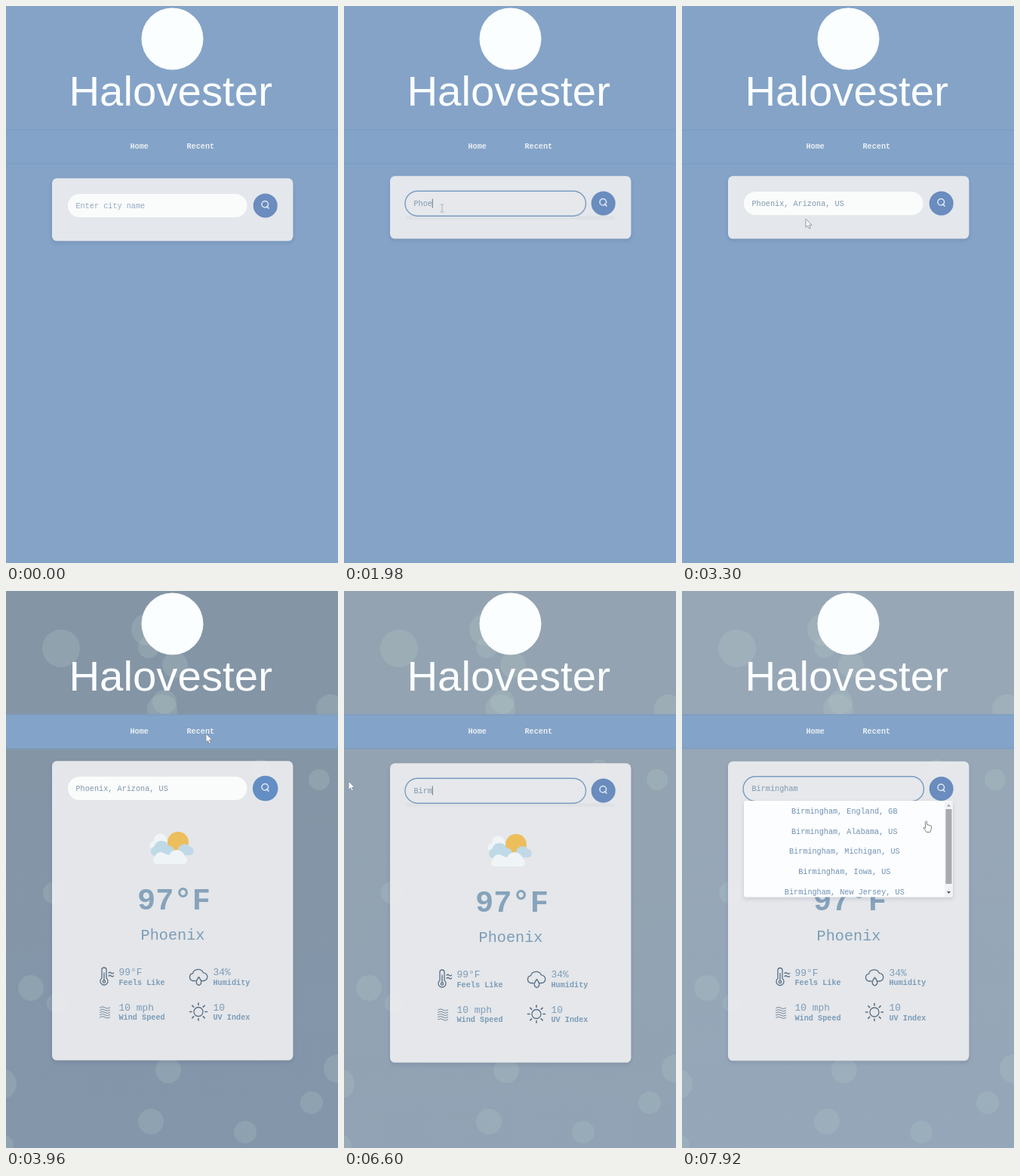
Write an HTML page that moves like this. It is 440 px wide and 738 px high and loops after 8 s.

```html
<!DOCTYPE html>
<html lang="en">
<head>
<meta charset="utf-8">
<title>Weather search</title>
<style>
  html, body { margin: 0; width: 100%; height: 100%; overflow: hidden; background: #84a3c7; }
  svg { display: block; width: 100%; height: 100%; }
  text { font-family: "Liberation Mono", "Courier New", monospace; font-size: 10.2px; white-space: pre; }
  .logo { font: 56.4px "Liberation Sans", Arial, sans-serif; fill: #fbfeff; }
  .bold { font-weight: bold; }
  .mid { text-anchor: middle; }
  #nav text { fill: #e9eff3; font-weight: bold; }
  #result text { fill: #7c9cb8; }
  #result .big { font-size: 40.4px; fill: #86a3bb; }
  #result .city { font-size: 20.2px; }
  #result .num { font-size: 12.9px; }
  #list text { fill: #6f91b3; }
  .line { fill: none; stroke: #5a6f85; stroke-width: 1.3; stroke-linecap: round; stroke-linejoin: round; }
  .pale { fill: #eff4f7; }
  .blue { fill: #c0d9e6; }
</style>
</head>
<body>
<svg viewBox="0 0 440 738" preserveAspectRatio="none">
  <defs>
    <filter id="soft" x="-10%" y="-20%" width="120%" height="150%">
      <feDropShadow dx="0" dy="2.5" stdDeviation="2.5" flood-color="#23344c" flood-opacity=".14"/>
    </filter>
    <linearGradient id="tint" x1="0" y1="0" x2="0" y2="1">
      <stop offset=".3" stop-color="#7f9fd0" stop-opacity="0"/>
      <stop offset="1" stop-color="#7f9fd0" stop-opacity=".1"/>
    </linearGradient>
  </defs>

  <rect id="bg" width="440" height="738"/>
  <g id="bubbles" fill="#b9d0c8" fill-opacity=".22"></g>

  <circle cx="220.5" cy="43.5" r="41" fill="#fbfeff"/>
  <text class="logo" x="83.4" y="132">Halovester</text>

  <g id="nav">
    <rect y="163.5" width="440" height="45" fill="#83a3c8"/>
    <path d="M0 164H440M0 208.8H440" stroke="#7b9bc0" stroke-width="1.4" stroke-opacity=".7"/>
    <text x="164.5" y="188.5">Home</text>
    <text x="239.5" y="188.5">Recent</text>
  </g>

  <g id="card">
    <rect id="panel" x="61" y=".3" width="319.4" rx="6.5" fill="#ecedef" fill-opacity=".93" filter="url(#soft)"/>
    <rect id="strip" x="82" y="53" width="277" height="5" rx="2" fill="#5a6270" fill-opacity=".04"/>
    <rect id="field"/>
    <rect id="mark" x="92.5" y="31" width="122.5" height="11" fill="#315fbd"/>
    <text id="query" x="92.5" y="39.8"></text>
    <path id="caret" stroke="#5d7488"/>
    <circle id="button" cx="343.7" cy="36.5"/>
    <circle cx="343.3" cy="34.8" r="4.3" fill="none" stroke="#dfe8f2" stroke-width="1.5"/>
    <path d="M345.5 37.5L348 40" stroke="#dfe8f2" stroke-width="1.7" stroke-linecap="round"/>

    <g id="result" transform="translate(0 -225)">
      <path class="pale" d="M197 343a6 6 0 0 1-1-12a8.5 8.5 0 0 1 16-5l5 17z"/>
      <circle cx="228" cy="333" r="14" fill="#edbe5c"/>
      <path class="blue" d="M228 350v-8a9 9 0 0 1 16-3a5.7 5.7 0 0 1 1 11z"/>
      <path class="blue" d="M197 351a6.500 6.500 0 0 1-.5-12.500a10 10 0 0 1 19-1a7 7 0 0 1 3 13.500z"/>
      <path class="pale" d="M200 362a5 5 0 0 1-3-9a8 8 0 0 1 13-5l6 2a11 11 0 0 1 21 2a5.3 5.3 0 0 1-1 10z"/>
      <text class="big bold mid" x="222.5" y="422">97°F</text>
      <text class="city mid" x="221" y="462">Phoenix</text>
      <g class="line">
        <path d="M127 513v-11a3 3 0 0 1 6 0v11a5 5 0 1 1-6 0zM130 506v10M136 506q1.7-1.5 3.3 0t3.3 0M136 510q1.7-1.5 3.3 0t3.3 0"/>
        <circle cx="130" cy="517.5" r="1.7"/>
        <path d="M251 516.5h-3.5a5 5 0 0 1 0-9.8a7.5 7.5 0 0 1 14-.8a5.3 5.3 0 0 1 0 10.6h-2M255.5 511.5q-6.5 8.5 0 11q6.5-2.5 0-11z"/>
        <circle cx="255" cy="557.5" r="6"/>
        <path id="rays" stroke-width="1.6"/>
        <path id="waves" stroke-width="1" stroke-opacity=".8"/>
      </g>
    </g>

    <g id="list" transform="translate(0 -225.5)">
      <rect x="82" y="278" width="277" height="127.5" rx="3" fill="#fcfdfe" filter="url(#soft)"/>
      <rect x="348" y="279" width="11" height="126" fill="#f1f2f3"/>
      <rect x="349.5" y="289" width="8" height="99" fill="#a8a9ab"/>
      <path d="M351 285.5l2.5-3l2.5 3z" fill="#a0a2a5"/>
      <path d="M351 398l2.5 3l2.5-3z" fill="#505358"/>
      <g id="rows"></g>
    </g>
  </g>

  <g id="cursor"><path id="pointer"/></g>
</svg>
<script>
const $ = id => document.getElementById(id);
const set = (id, attrs) => {
  for (const k in attrs) $(id).setAttribute(k, attrs[k]);
};
const show = (id, on) => set(id, { visibility: on ? 'visible' : 'hidden' });
const add = (parent, tag, attrs, text = '') => {
  const el = document.createElementNS('http://www.w3.org/2000/svg', tag);
  for (const k in attrs) el.setAttribute(k, attrs[k]);
  el.textContent = text;
  $(parent).append(el);
};

const STEP = 660, LOOP = 8000, CHAR = 6.12;
const SKY = '#84a3c7', CHOSEN = 'Phoenix, Arizona, US';

const bubbles = [
  [73, 76, 25], [187, 51, 21], [189, 75, 14], [224, 98, 17], [207, 157, 20],
  [210, 147, 16], [430, 156, 19], [415, 250, 14], [338, 236, 13], [64, 400, 15],
  [33, 526, 17], [67, 546, 13], [-6, 653, 20], [215, 635, 17], [192, 703, 17],
  [317, 717, 15], [405, 678, 15], [440, 633, 19], [-5, 735, 15]
];
bubbles.forEach(([cx, cy, r]) => add('bubbles', 'circle', { cx, cy, r }));
add('bubbles', 'rect', { width: 440, height: 738, fill: 'url(#tint)', 'fill-opacity': 1 });

const facts = [
  [150, 509, '99°F', 'Feels Like'], [275, 509, '34%', 'Humidity'],
  [150, 555.5, '10 mph', 'Wind Speed'], [275, 555.5, '10', 'UV Index']
];
facts.forEach(([x, y, value, label]) => {
  add('result', 'text', { x: x - .5, y, class: 'num' }, value);
  add('result', 'text', { x: x - .5, y: y + 12.5, class: 'bold' }, label);
});

let rays = '', waves = '';
for (let i = 0; i < 8; i++) {
  const a = i * Math.PI / 4;
  const at = r => `${255 + r * Math.cos(a)} ${557.5 + r * Math.sin(a)}`;
  rays += `M${at(9)}L${at(11.5)}`;
}
for (let i = 0; i < 5; i++) waves += `M124.5 ${552 + i * 3.2}q3.3-2.5 6.6 0t6.6 0`;
set('rays', { d: rays });
set('waves', { d: waves });

const places = {
  Phoenix: ['Arizona, US', 'Illinois, US', 'New York, US', 'Maryland, US', 'Oregon, US'],
  Birmingham: ['England, GB', 'Alabama, US', 'Michigan, US', 'Iowa, US', 'New Jersey, US']
};

const pointers = {
  arrow: { d: 'M0 0v11.5l2.6-2.4l1.9 4l1.9-.9l-1.9-3.9h3.6z', fill: '#f6f8fb', stroke: '#7d8896', 'stroke-width': .8 },
  beam: { d: 'M-2.5-5h2l.5.5l.5-.5h2M0-4.5v9M-2.5 5h2l.5-.5l.5.5h2', fill: 'none', stroke: '#a3b4c8', 'stroke-width': 1 },
  hand: { d: 'M-2.5-6.5q1-1.5 2 0v4l5.5 1.5q1 .5.5 3l-1.5 5.5h-5l-4-5.5q0-1.8 2.5.5z', fill: '#fff', stroke: '#7d8794', 'stroke-width': 1 }
};

const found = { result: true };
const steps = [
  { top: 228 },
  { top: 226, cur: ['beam', 130, 268] },
  { top: 225, focus: true, cur: ['beam', 130, 268] },
  { top: 225, text: 'Phoe', focus: true, strip: true, cur: ['beam', 130, 268] },
  { top: 225, text: 'Phoenix', focus: true, list: true, cur: ['hand', 167, 288] },
  { top: 225, text: CHOSEN, cur: ['arrow', 164, 282] },
  { ...found, top: 225, bg: '#8495a6', text: CHOSEN, hot: true, cur: ['arrow', 265, 189] },
  { ...found, top: 225, bg: '#899aaa', text: CHOSEN, focus: true, cur: ['beam', 224, 262] },
  { ...found, top: 228, bg: '#8d9fae', text: CHOSEN, focus: true, mark: true, cur: ['arrow', 6, 252] },
  { ...found, top: 228, bg: '#90a1b0', text: 'Bi', focus: true, strip: true, cur: ['arrow', 6, 252] },
  { ...found, top: 228, bg: '#93a3b1', text: 'Birm', focus: true, strip: true, cur: ['arrow', 6, 252] },
  { ...found, top: 228, bg: '#95a5b4', text: 'Birmingham', focus: true, list: true, cur: ['arrow', 6, 252] },
  { ...found, top: 225.5, bg: '#97a7b6', text: 'Birmingham', focus: true, list: true, cur: ['hand', 325, 312] }
];

function render(s) {
  const text = s.text || '';
  set('bg', { fill: s.bg || SKY });
  show('bubbles', s.bg);
  show('result', s.result);
  set('card', { transform: `translate(0 ${s.top})` });
  set('panel', { height: s.result ? 396.5 : 83 });

  set('field', s.focus
    ? { x: 81, y: 20.2, width: 239.5, height: 33, rx: 16.5, fill: '#e6e8eb', stroke: '#7a9cc1', 'stroke-width': 1.4 }
    : { x: 82, y: 21, width: 237.5, height: 31, rx: 15.5, fill: '#fafbfb', stroke: 'none' });
  $('query').textContent = text || 'Enter city name';
  set('query', { fill: s.mark ? '#eef3fc' : text ? '#7f97ad' : '#93aac5' });
  const x = 92.8 + CHAR * text.length;
  set('caret', { d: `M${x} 30.5v12` });
  show('caret', s.focus && text && !s.mark && !s.list);
  show('mark', s.mark);
  show('strip', s.strip);
  set('button', s.hot ? { r: 16.8, fill: '#638ec4' } : { r: 16, fill: '#6a8cbe' });

  show('list', s.list);
  $('rows').replaceChildren();
  if (s.list) places[text].forEach((place, i) =>
    add('rows', 'text', { x: 215.3, y: 294.8 + i * 26.7, class: 'mid' }, `${text}, ${place}`));

  show('cursor', s.cur);
  if (s.cur) {
    const [kind, cx, cy] = s.cur;
    set('pointer', pointers[kind]);
    set('cursor', { transform: `translate(${cx} ${cy})` });
  }
}

let last = -1;
function tick() {
  const i = Math.floor(performance.now() % LOOP / STEP);
  if (i !== last) render(steps[last = i]);
  requestAnimationFrame(tick);
}
tick();
</script>
</body>
</html>
```
